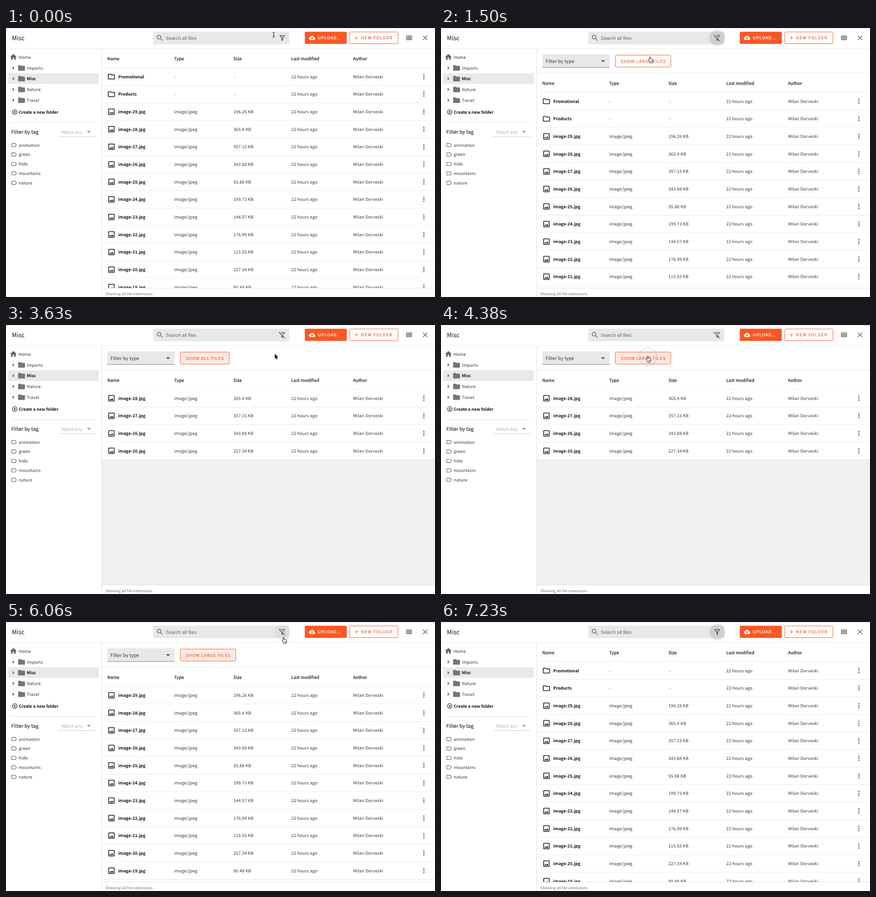
Recreate the animation shown at these times as an HTML page. Size 944 by 593 pixels, loop 7.26 s.

```html
<!DOCTYPE html>
<html lang="en">
<head>
<meta charset="utf-8">
<title>File manager</title>
<style>
html, body { margin: 0; width: 100%; height: 100%; overflow: hidden; background: #fff; }
svg { display: block; }
text {
  font: 9.32px "Noto Sans CJK JP", "Noto Sans CJK SC", "Noto Sans CJK", "Noto Sans", sans-serif;
  letter-spacing: .186px; fill: #333; white-space: pre; text-rendering: geometricPrecision;
}
.bold { font-weight: 700; font-size: 9.2px; letter-spacing: 0; fill: #111; }
.medium { fill: #1c1c1c; stroke: #1c1c1c; stroke-width: .28px; }
.title { font-size: 13.3px; letter-spacing: .1px; fill: #111; }
.subtitle { font-size: 10.65px; letter-spacing: .11px; fill: #1c1c1c; stroke: #1c1c1c; stroke-width: .15px; }
.select { font-size: 10.2px; letter-spacing: .09px; }
.search { font: 10.42px "Liberation Sans", Arial, sans-serif; letter-spacing: 0; fill: #666; }
.muted { fill: #aaa; font-size: 9.4px; }
.caption { font-size: 8px; fill: #666; }
.button { letter-spacing: .95px; fill: #e9653c; stroke: #e9653c; stroke-width: .22px; }
.upload { fill: #fff; stroke: #fff; }
.wide { letter-spacing: 1.25px; }
.line { stroke: #e2e2e2; stroke-width: 1; }
</style>
</head>
<body>
<svg id="stage" width="944" height="593" viewBox="0 0 944 593"></svg>
<script>
const LOOP = 7260, ROW = 38.67, BAR = 54.3, ORANGE = '#fa5723';

const ICONS = {
  search: 'M15.5 14h-.79l-.28-.27C15.41 12.59 16 11.11 16 9.5 16 5.91 13.09 3 9.5 3S3 5.91 3 9.5 5.91 16 9.5 16c1.61 0 3.09-.59 4.23-1.57l.27.28v.79l5 4.99L20.49 19l-4.99-5zm-6 0C7.01 14 5 11.99 5 9.5S7.01 5 9.5 5 14 7.01 14 9.5 11.99 14 9.5 14z',
  cloud: 'M19.35 10.04C18.67 6.59 15.64 4 12 4 9.11 4 6.6 5.64 5.35 8.04 2.34 8.36 0 10.91 0 14c0 3.31 2.69 6 6 6h13c2.76 0 5-2.24 5-5 0-2.64-2.05-4.78-4.65-4.96zM14 13v4h-4v-4H7l5-5 5 5h-3z',
  folder: 'M10 4H4c-1.1 0-2 .9-2 2v12c0 1.1.9 2 2 2h16c1.1 0 2-.9 2-2V8c0-1.1-.9-2-2-2h-8l-2-2z',
  folderOutline: 'M9.17 6l2 2H20v10H4V6h5.17M10 4H4c-1.1 0-2 .9-2 2v12c0 1.1.9 2 2 2h16c1.1 0 2-.9 2-2V8c0-1.1-.9-2-2-2h-8l-2-2z',
  image: 'M19 5v14H5V5h14m0-2H5c-1.1 0-2 .9-2 2v14c0 1.1.9 2 2 2h14c1.1 0 2-.9 2-2V5c0-1.1-.9-2-2-2zm-4.86 8.86l-3 3.87L9 13.14 6 17h12l-3.86-5.14z',
  more: 'M12 8c1.1 0 2-.9 2-2s-.9-2-2-2-2 .9-2 2 .9 2 2 2zm0 2c-1.1 0-2 .9-2 2s.9 2 2 2 2-.9 2-2-.9-2-2-2zm0 6c-1.1 0-2 .9-2 2s.9 2 2 2 2-.9 2-2-.9-2-2-2z',
  home: 'M10 20v-6h4v6h5v-8h3L12 3 2 12h3v8z',
  filter: 'M7 6h10l-5.01 6.3L7 6zm-2.75-.39C6.27 8.2 10 13 10 13v6c0 .55.45 1 1 1h2c.55 0 1-.45 1-1v-6s3.72-4.8 5.74-7.39c.51-.66.04-1.61-.79-1.61H5.04c-.83 0-1.3.95-.79 1.61z',
  filterOff: 'M16.95 6l-3.57 4.55 1.43 1.43c1.03-1.31 4.98-6.37 4.98-6.37C20.3 4.95 19.83 4 19 4H6.83l2 2h8.12zM2.81 2.81L1.39 4.22 10 13v6c0 .55.45 1 1 1h2c.55 0 1-.45 1-1v-2.17l5.78 5.78 1.41-1.41L2.81 2.81z',
  tag: 'M17.63 5.84C17.27 5.33 16.67 5 16 5H5c-1.1 0-2 .9-2 2v10c0 1.1.9 2 2 2h11c.67 0 1.27-.33 1.63-.84L22 12l-4.37-6.16zM16 17H5V7h11l3.55 5L16 17z',
  addCircle: 'M13 7h-2v4H7v2h4v4h2v-4h4v-2h-4V7zm-1-5C6.48 2 2 6.48 2 12s4.48 10 10 10 10-4.48 10-10S17.52 2 12 2zm0 18c-4.41 0-8-3.59-8-8s3.59-8 8-8 8 3.59 8 8-3.59 8-8 8z',
  grid: 'M4 5v13h17V5H4zm10 2v3.5h-3V7h3zM6 7h3v3.5H6V7zm0 9v-3.5h3V16H6zm5 0v-3.5h3V16h-3zm8 0h-3v-3.5h3V16zm-3-5.5V7h3v3.5h-3z',
  close: 'M19 6.41L17.59 5 12 10.59 6.41 5 5 6.41 10.59 12 5 17.59 6.41 19 12 13.41 17.59 19 19 17.59 13.41 12z',
  add: 'M19 13h-6v6h-2v-6H5v-2h6V5h2v6h6v2z'
};

const icon = (name, cx, cy, size = 17.9, fill = '#666') =>
  `<path d="${ICONS[name]}" fill="${fill}" transform="translate(${cx - size / 2} ${cy - size / 2}) scale(${size / 24})"/>`;
// Text is placed by its left edge and the middle of its capitals.
const text = (str, x, cy, cls = '', drop = 3.5) => `<text class="${cls}" x="${x}" y="${cy + drop}">${str}</text>`;
const rect = (x, y, w, h, fill, extra = '') => `<rect x="${x}" y="${y}" width="${w}" height="${h}" fill="${fill}" ${extra}/>`;
const line = (x1, y1, x2, y2, extra = '') => `<path class="line" d="M${x1} ${y1}L${x2} ${y2}" ${extra}/>`;
const caret = (x, y, fill) => `<path d="M${x} ${y}h9l-4.5 4.6z" fill="${fill}"/>`;
const group = (id, body) => `<g id="${id}">${body}</g>`;

function row(i, glyph, name, type, size) {
  const cy = 107.2 + i * ROW, dash = type === '-' ? 1.5 : 0;
  return rect(211, cy - 19, 733, ROW, '#fff') + icon(glyph, 232, cy, 18.4, '#111') +
    text(name, 247, cy, 'bold') + text(type, 370, cy) + text(size, 500.5 + dash, cy) +
    text('22 hours ago', 627.8, cy) + text('Milan Dorveski', 763.8, cy) +
    icon('more', 919.5, cy, 18) + line(211, cy + 19.4, 944, cy + 19.4);
}

const sizes = [196.26, 365.4, 357.15, 343.88, 55.88, 199.73, 144.57, 176.99, 115.55, 227.34, 90.48];
const files = sizes.map((kb, i) => [`image-${29 - i}.jpg`, 'image/jpeg', kb + ' KB']);
const large = files.filter((_, i) => sizes[i] > 200);
const folders = ['Promotional', 'Products'];

const topBar =
  line(0, .5, 944, .5) + line(0, 45.5, 944, 45.5, 'opacity=".7"') + text('Misc', 13, 21.5, 'title', 5) +
  rect(324, 8, 299.5, 27.7, '#e8e8e8', 'rx="1.5"') + icon('search', 338.7, 22) +
  text('Search all files', 351.5, 22, 'search', 3.8) +
  '<circle id="halo" cx="607.8" cy="22" r="17.5"/>' +
  group('funnel', icon('filter', 607.8, 22, 17.9, '#555')) +
  group('funnelOff', icon('filterOff', 607.8, 22, 17.9, '#555')) +
  rect(657.5, 8.3, 92.3, 26.7, ORANGE, 'rx="2"') + icon('cloud', 673.5, 21.8, 14, '#fff') +
  text('UPLOAD...', 686, 21.8, 'button upload') +
  rect(756.3, 8.8, 106.2, 25.8, '#fff', `rx="2" stroke="${ORANGE}"`) + icon('add', 771.3, 21.8, 13.4, '#e9653c') +
  text('NEW FOLDER', 781, 21.8, 'button wide') + icon('grid', 886.5, 22, 18) + icon('close', 922.3, 21.7, 18);

const treeRow = (name, i) => {
  const y = 88 + i * 23.75, open = name === 'Misc';
  return (open ? rect(4.5, y - 12, 199.5, 23.5, '#e9e9e9') : '') +
    `<path d="M14.7 ${y - 3.7}v7.4l3.8-3.7z" fill="#666"/>` +
    icon('folder', 34.2, y, 18.2, '#757575') + text(name, 45.8, y, open ? 'bold' : '');
};
const sidebar =
  line(210.5, 46, 210.5, 593) + icon('home', 16.3, 64, 17.7) + text('Home', 27.8, 64) +
  ['Imports', 'Misc', 'Nature', 'Travel'].map(treeRow).join('') +
  icon('addCircle', 19.3, 185, 13.4, '#111') + text('Create a new folder', 28, 185, 'bold') +
  line(12, 208.5, 198, 208.5) + text('Filter by tag', 11.8, 229, 'subtitle', 3.8) +
  text('Match any', 122, 229, 'muted') + caret(177.8, 227, '#999') + line(114.5, 239.5, 197, 239.5, 'style="stroke:#ccc"') +
  ['animation', 'green', 'hide', 'mountains', 'nature'].map((name, i) => {
    const y = 258 + i * 20.85;
    return icon('tag', 17.5, y, 14.8) + text(name, 28, y);
  }).join('');

const toggle = (id, label, width) => group(id,
  `<rect class="tint" x="383.7" y="59.7" width="${width}" height="26.3" rx="2" stroke="${ORANGE}"/>` +
  text(label, 395.5, 73, 'button'));
const filterBar = group('bar',
  rect(211, 46, 733, BAR - .5, '#fff') + line(211, 99.7, 944, 99.7) +
  '<path d="M223 87V60q0-2 2-2h144q2 0 2 2v27z" fill="#e8e8e8"/>' + line(223, 87, 371, 87, 'style="stroke:#777"') +
  text('Filter by type', 230, 73, 'select', 3.6) + caret(352, 71, '#555') +
  toggle('showLarge', 'SHOW LARGE FILES', 122) + toggle('showAll', 'SHOW ALL FILES', 107.5));

const heads = [['Name', 223], ['Type', 370], ['Size', 500.5], ['Last modified', 627.8], ['Author', 763.8]];
const table = group('table',
  rect(211, 46, 733, 42, '#fff') + line(211, 88, 944, 88) +
  heads.map(([name, x]) => text(name, x, 67.3, 'medium')).join('') +
  group('folders', folders.map((name, i) => row(i, 'folderOutline', name, '-', '-')).join('')) +
  group('files', files.map((f, i) => row(i + 2, 'image', ...f)).join('')) +
  group('large', rect(211, 88.5, 733, 520, '#f0f0f0') + large.map((f, i) => row(i, 'image', ...f)).join('')));

const cursor = group('cursor',
  '<circle id="ring" r="19.7" fill="#7fa8e8" fill-opacity=".13" stroke="#6d9ad6" stroke-width="2"/>' +
  group('beam', '<path d="M-2.6-5.6Q0-5.6 0-4.2V4.2Q0 5.6-2.6 5.6M2.6-5.6Q0-5.6 0-4.2M0 4.2Q0 5.6 2.6 5.6M-1.4 1.6H1.4" fill="none" stroke="#111"/>') +
  group('hand', '<path d="M-1.2 5.2V-.4a1.1 1.1 0 0 1 2.2 0V3.4c.4-.8 1.9-.7 2 .3c.4-.7 1.8-.6 1.9.4c.5-.6 1.6-.3 1.6.7V8c0 2-1 2.4-1.2 4H-.2C-.6 10-3 8-3.5 5.8c-.2-.9.8-1.4 1.4-.7z" fill="#fff" stroke="#111"/><path d="M1.2 7v3M3 7v3M4.7 7v3" stroke="#111" stroke-width=".6"/>') +
  group('arrow', '<path d="M0 0V10.6L2.4 8.4L4 12L5.9 11.2L4.3 7.6H7.5Z" fill="#000" stroke="#fff" stroke-width="1" paint-order="stroke"/>'));

document.getElementById('stage').innerHTML =
  '<clipPath id="panel"><path d="M211 46H944V573H211Z"/></clipPath>' + topBar + sidebar +
  `<g clip-path="url(#panel)">${table}${filterBar}</g>` +
  line(211, 573.5, 944, 573.5) + text('Showing all file extensions.', 218.8, 586, 'caption', 3) + cursor;

// Writes CSS keyframes from [milliseconds, value] stops.
const sheet = document.head.appendChild(document.createElement('style'));
let count = 0;
function track(selector, property, stops, easing = 'step-end') {
  const name = 'track' + count++;
  const frames = stops.map(([ms, value]) => `${ms / LOOP * 100}% { ${property}: ${value} }`).join(' ');
  sheet.textContent += `@keyframes ${name} { ${frames} }
${selector} { animation: ${name} ${LOOP}ms ${easing} infinite }\n`;
}
const show = (id, first, ...flips) =>
  track('#' + id, 'opacity', [[0, first], ...flips.map((ms, i) => [ms, (first + i + 1) % 2])]);
const move = (x, y) => `translate(${x}px, ${y}px)`;

show('bar', 0, 390, 7050);
show('funnelOff', 0, 390, 7050);
show('funnel', 1, 390, 7050);
show('showAll', 0, 2280, 4230);
show('showLarge', 1, 2280, 4230);
show('folders', 1, 2430, 6390);
show('large', 0, 2430, 5100);
show('beam', 1, 90);
show('hand', 0, 90, 870, 1440, 2880, 3780, 4500, 6000, 6570);
show('arrow', 0, 2880, 3780, 4500, 6000);

track('#table', 'transform', [[0, move(0, 0)], [390, move(0, BAR)], [7050, move(0, 0)]]);
track('#files', 'transform', [[0, move(0, 0)], [2430, move(0, -2 * ROW)], [6390, move(0, 0)]]);
track('.tint', 'fill', [[0, '#fff'], [2040, '#fff5f2'], [2190, '#fcdfd5'], [2460, '#fde9e3'], [4140, '#fcdfd5'], [4380, '#fde9e3']]);
track('#halo', 'fill-opacity', [[0, 0], [120, .04], [330, .11], [2040, 0], [6000, .045], [6300, .11]]);
track('#cursor', 'transform', [
  [0, move(589, 15)], [240, move(597, 21)], [1410, move(597, 21)], [1530, move(441, 71)],
  [2040, move(441, 71)], [2220, move(472, 69)], [2820, move(472, 69)], [2940, move(591.5, 63.5)],
  [3630, move(591.5, 63.5)], [3960, move(455, 70)], [4380, move(455, 70)], [4650, move(672, 71)],
  [5640, move(672, 71)], [6060, move(611, 35)], [6210, move(608, 23)], [7260, move(608, 23)]
], 'ease-in-out');
const clicks = [330, 2190, 4140, 6300];
track('#ring', 'opacity', [[0, 0],
  ...clicks.flatMap(ms => [[ms, 0], [ms + 60, 1], [ms + 150, 1], [ms + 270, 0]]), [LOOP, 0]], 'linear');
</script>
</body>
</html>
```
